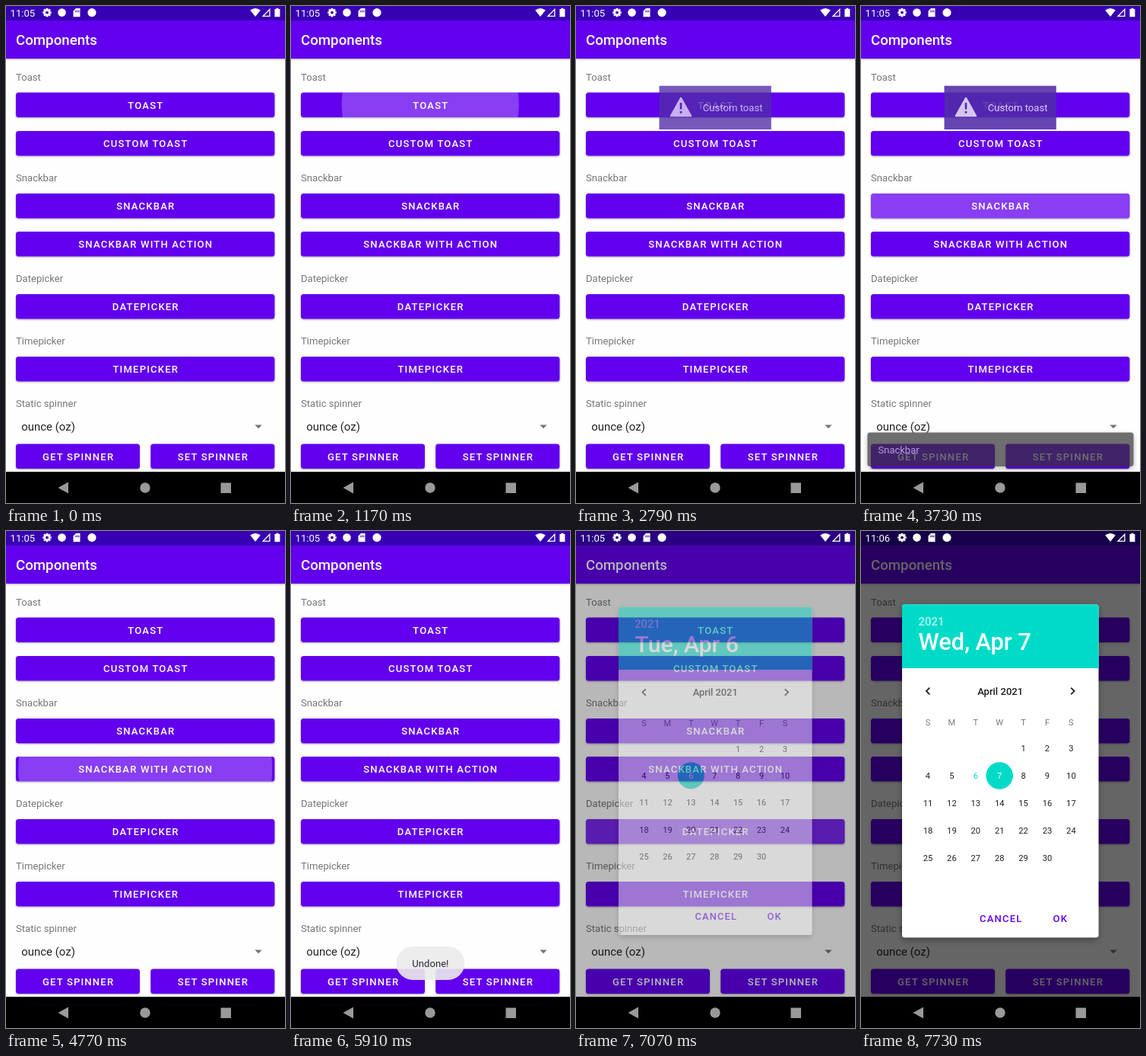
An HTML page for the animation above (8 s loop, 367 by 652 pixels).

```html
<!DOCTYPE html>
<html lang="en">
<head>
<meta charset="utf-8">
<title>Components</title>
<style>
  html, body { margin: 0; width: 100%; height: 100%; overflow: hidden; background: #fff; }
  svg { display: block; width: 100vw; height: 100vh; font-family: Roboto, sans-serif; font-size: 13.1px; }
  text { white-space: pre; }
  .btn { font-weight: 500; letter-spacing: 1.17px; }
  .mid { text-anchor: middle; }
</style>
</head>
<body>
<svg id="stage" viewBox="0 0 367 652">
  <defs>
    <filter id="low" x="-10%" y="-30%" width="120%" height="170%">
      <feDropShadow dx="0" dy="1" stdDeviation="0.9" flood-opacity=".32"/>
    </filter>
    <filter id="high" x="-15%" y="-15%" width="130%" height="135%">
      <feDropShadow dx="0" dy="3" stdDeviation="4" flood-opacity=".35"/>
    </filter>
  </defs>
  <g id="page"></g>
  <g id="overlay"></g>
  <rect id="dim" width="367" height="611"/>
  <g id="status" fill="#fff"></g>
  <g id="dialog"></g>
  <g id="nav" fill="#999">
    <rect y="611" width="367" height="41" fill="#000"/>
    <path d="M68.5 632 82 624.5V639.5Z"/>
    <circle cx="183" cy="632" r="6.7"/>
    <rect x="282.5" y="625.5" width="13.5" height="13.5"/>
  </g>
</svg>
<script>
const LOOP = 8000;
const PURPLE = '#6200ee', TEAL = '#00dbc8';
const $ = id => document.getElementById(id);

function add(parent, tag, attrs = {}, text) {
  const el = document.createElementNS('http://www.w3.org/2000/svg', tag);
  for (const k in attrs) el.setAttribute(k, attrs[k]);
  if (text !== undefined) el.textContent = text;
  return parent.appendChild(el);
}
const rect = (p, x, y, width, height, fill, more) => add(p, 'rect', { x, y, width, height, fill, ...more });
const label = (p, x, y, text, fill, more) => add(p, 'text', { x, y, fill, ...more }, text);
const path = (p, d, more) => add(p, 'path', { d, ...more });

// Page
const page = $('page');
rect(page, 0, 0, 367, 611, '#fefefe');
rect(page, 0, 19, 367, 50, PURPLE, { filter: 'url(#low)' });
rect(page, 0, 0, 367, 19, '#3700b3');
label(page, 13, 51.3, 'Components', '#fff', { 'font-size': 18.7, 'font-weight': 500 });

[['Toast', 97.7], ['Snackbar', 230], ['Datepicker', 361.8], ['Timepicker', 444], ['Static spinner', 526]]
  .forEach(([s, y]) => label(page, 13, y, s, '#767676'));
label(page, 20.3, 557, 'ounce (oz)', '#212121', { 'font-size': 14.95 });
path(page, 'M327.3 549.5h9.4l-4.7 4.7z', { fill: '#757575' });

// Each button returns its ripple circle, clipped to the button shape.
function button(text, x, y, w) {
  const h = 32.6, id = 'clip' + Math.round(x + y), cx = x + w / 2, cy = y + h / 2;
  rect(page, x, y, w, h, PURPLE, { rx: 3.5, filter: 'url(#low)' });
  rect(add(page, 'clipPath', { id }), x, y, w, h, '#000', { rx: 3.5 });
  const g = add(page, 'g', { 'clip-path': `url(#${id})` });
  const ripple = add(g, 'circle', { cx, cy, r: 0, fill: '#fff' });
  label(page, cx + .6, cy + 4.7, text, '#fff', { class: 'btn mid' });
  return ripple;
}
const wide = (text, y) => button(text, 13, y, 340.4);
const ripples = {
  toast: wide('TOAST', 113.5),
  custom: wide('CUSTOM TOAST', 163.9),
  snack: wide('SNACKBAR', 245.9),
  action: wide('SNACKBAR WITH ACTION', 295.9),
  date: wide('DATEPICKER', 378)
};
wide('TIMEPICKER', 460);
button('GET SPINNER', 13, 574.5, 163);
button('SET SPINNER', 190.3, 574.5, 163);

// Status bar
const bar = $('status');
const clock = label(bar, 5.6, 13.6, '11:05');
for (let a = 0; a < 360; a += 45) rect(bar, 52.6, 2.9, 2.8, 3, '#fff', { transform: `rotate(${a} 54 8.6)` });
add(bar, 'circle', { cx: 54, cy: 8.6, r: 3.1, fill: 'none', stroke: '#fff', 'stroke-width': 2.3 });
add(bar, 'circle', { cx: 73.5, cy: 8.6, r: 5.3 });
path(bar, 'M92 3h5.5v11.3h-9V6.5zM91.3 5.7v2.6h1V5.7zm2 0v2.6h1V5.7zm2 0v2.6h1V5.7z', { 'fill-rule': 'evenodd' });
add(bar, 'circle', { cx: 113, cy: 8.6, r: 5.6 });
path(bar, 'M321.2 5.6Q328 .2 334.8 5.6L328 14z');
path(bar, 'M347.5 2.8V14H336.5zM346.2 6v6.7h-6.6z', { 'fill-rule': 'evenodd' });
path(bar, 'M353.4 4h2v-1.3h3V4h2v10.2h-7z');

// Toasts and snackbars
const overlay = $('overlay');
const layer = () => add(overlay, 'g');

function snackbar(text, action) {
  const g = layer();
  rect(g, 7.5, 559.5, 352, 44.5, '#323232', { rx: 3.5, filter: 'url(#high)' });
  label(g, 21.6, 587, text, '#e0e0e0');
  if (!action) return g;
  g.glow = rect(g, 297, 565, 58, 33, '#a374f5', { rx: 3.5, opacity: 0 });
  label(g, 346, 587, action, '#a374f5', { class: 'btn', 'text-anchor': 'end' });
  return g;
}
function pill(text, w) {
  const g = layer();
  rect(g, 183.4 - w / 2, 545, w, 44, '#ececec', { rx: 22, 'fill-opacity': .9 });
  label(g, 183.4, 572, text, '#2a2a3a', { class: 'mid' });
  return g;
}
const snack = snackbar('Snackbar');
const snackAction = snackbar('Snackbar with action', 'UNDO');
const toast = pill('Toast', 75);
const undone = pill('Undone!', 90);
const custom = layer();
rect(custom, 109.5, 104.7, 147.3, 57.3, '#512da8');
path(custom, 'M138 120.5 151.3 144.2H124.7z', { fill: '#e6e0f2', stroke: '#e6e0f2', 'stroke-width': 2, 'stroke-linejoin': 'round' });
path(custom, 'M136.7 127h2.6v8.6h-2.6zM136.7 138h2.6v2.8h-2.6z', { fill: '#512da8' });
label(custom, 166.8, 138, 'Custom toast', '#ece6f7');

// Date dialog
const dialog = $('dialog');
rect(dialog, 54, 96.3, 258.5, 437, '#fff', { rx: 3.5, filter: 'url(#high)' });
path(dialog, 'M54 180V99.8q0-3.5 3.5-3.5h251.5q3.5 0 3.5 3.5V180z', { fill: TEAL });
label(dialog, 75.6, 124.2, '2021', '#fff', { 'font-size': 14.95, 'font-weight': 500, opacity: .7 });
const heading = label(dialog, 75.6, 156.2, '', '#fff', { 'font-size': 30.8, 'font-weight': 500 });
label(dialog, 183.2, 214.5, 'April 2021', '#212121', { class: 'mid', 'font-weight': 500 });
path(dialog, 'M90.3 205.6 85.9 210l4.4 4.4M276.2 205.6l4.4 4.4-4.4 4.4', { fill: 'none', stroke: '#222', 'stroke-width': 1.8 });

const colX = c => 88 + c * 31.4;
const small = { class: 'mid', 'font-size': 11.2 };
[...'SMTWTFS'].forEach((s, c) => label(dialog, colX(c), 255, s, '#7a7a7a', small));
const press = add(dialog, 'circle', { cx: colX(3), cy: 321, r: 17.8, fill: TEAL, opacity: 0 });
const picked = add(dialog, 'circle', { cy: 321, r: 17.8, fill: TEAL });
const days = [];
for (let d = 1; d <= 30; d++) {
  const cell = d + 3;
  days[d] = label(dialog, colX(cell % 7), 289.2 + 35.9 * Math.floor(cell / 7), d, '#212121', small);
}
label(dialog, 156, 513.2, 'CANCEL', PURPLE, { class: 'btn' });
label(dialog, 252.6, 513.2, 'OK', PURPLE, { class: 'btn' });

// Motion
const ramp = (t, a, b) => Math.min(1, Math.max(0, (t - a) / (b - a)));
const easeOut = p => 1 - (1 - p) ** 3;
const pulse = (t, a, b, c, d) => ramp(t, a, b) * (1 - ramp(t, c, d));

// name: press start, fully grown, fade start, fade end
const PRESSES = {
  toast: [1110, 1200, 1230, 1430],
  custom: [2240, 2340, 2380, 2620],
  snack: [3630, 3710, 3740, 3890],
  action: [4705, 4773, 4790, 4910],
  date: [6820, 6980, 7035, 7130]
};
// layer: fade in, fade out
const FADES = [
  [toast, 1280, 1490, 2250, 2480],
  [custom, 2580, 2850, 3710, 3890],
  [snack, 3640, 3770, 4705, 4765],
  [snackAction, 4780, 4910, 5570, 5680],
  [undone, 5680, 5910, 6665, 6880]
];

const scaleAbout = (s, x, y) => `translate(${x} ${y}) scale(${s}) translate(${-x} ${-y})`;

function render(t) {
  for (const name in PRESSES) {
    const [a, b, c, d] = PRESSES[name];
    ripples[name].setAttribute('r', t < a ? 0 : 172 * ramp(t, a, b));
    ripples[name].setAttribute('opacity', .245 * (1 - ramp(t, c, d)));
  }
  for (const [el, ...times] of FADES) el.setAttribute('opacity', pulse(t, ...times));
  for (const [el, a, b] of [[snack, 3640, 3770], [snackAction, 4780, 4910]])
    el.setAttribute('transform', scaleAbout(.8 + .2 * easeOut(ramp(t, a, b)), 183.5, 581.7));
  snackAction.glow.setAttribute('opacity', .25 * ramp(t, 5450, 5530));

  const open = ramp(t, 7020, 7130);
  $('dim').setAttribute('opacity', .6 * open);
  bar.setAttribute('opacity', 1);
  dialog.setAttribute('opacity', open);
  dialog.setAttribute('transform', scaleAbout(.9 + .1 * easeOut(open), 183.3, 315));

  clock.textContent = t < 7280 ? '11:05' : '11:06';
  const next = t >= 7730;
  heading.textContent = next ? 'Wed, Apr 7' : 'Tue, Apr 6';
  picked.setAttribute('cx', colX(next ? 3 : 2));
  press.setAttribute('opacity', t >= 7660 && !next ? .3 : 0);
  days[6].setAttribute('fill', next ? TEAL : '#fff');
  days[7].setAttribute('fill', next ? '#fff' : '#212121');
}

const start = performance.now();
function tick() {
  render((performance.now() - start) % LOOP);
  requestAnimationFrame(tick);
}
render(0);
requestAnimationFrame(tick);
</script>
</body>
</html>
```
